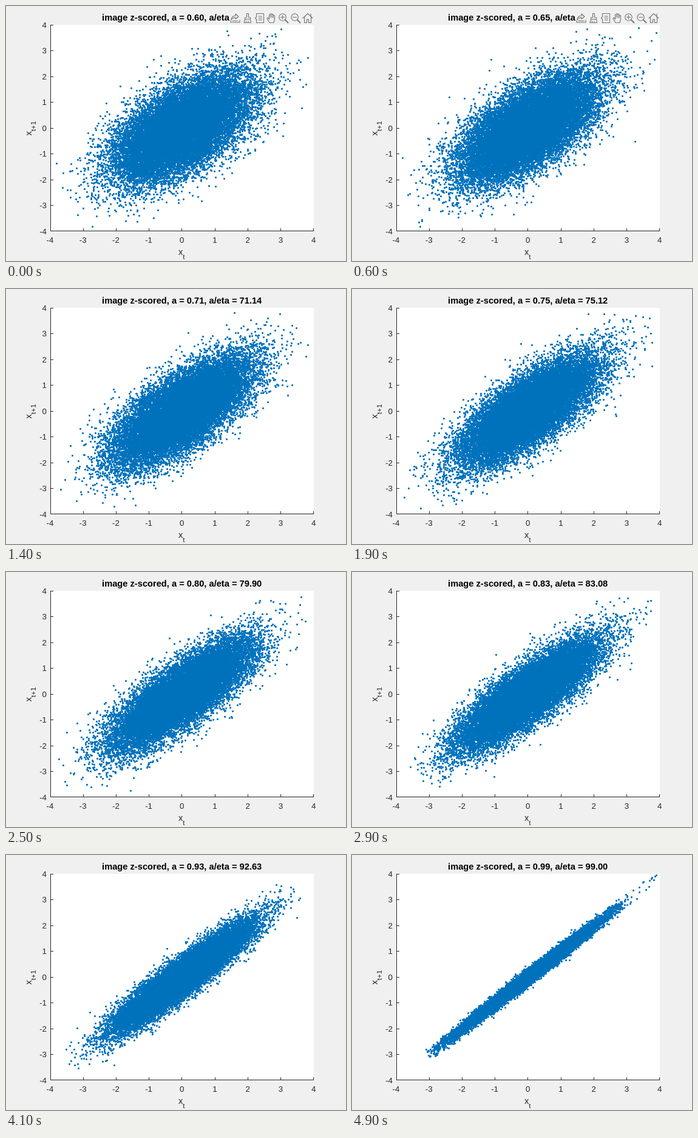
An HTML page with a canvas that plays this animation: 560x420 px, repeating every 5000 ms.

```html
<!DOCTYPE html>
<html lang="en">
<head>
<meta charset="utf-8">
<title>Lag scatter</title>
<style>
  html, body { margin: 0; width: 100%; height: 100%; overflow: hidden; background: #f0f0f0; }
  #stage { position: relative; width: 560px; height: 420px; overflow: hidden; }
  svg, canvas { position: absolute; left: 0; top: 0; display: block; }
  text { font-family: "Liberation Sans", Arial, sans-serif; fill: #262626; }
  #ticks text { font-size: 13.333px; }
  .label { font-size: 14.667px; }
  .sub { font-size: 11.733px; }
  #title { font-size: 14.667px; font-weight: bold; fill: #000; }
  #axes { stroke: #262626; fill: none; }
  #tools { fill: none; stroke: #737373; stroke-width: 1.1; stroke-linejoin: round; stroke-linecap: round; }
</style>
</head>
<body>
<div id="stage">
  <svg width="560" height="420">
    <rect width="560" height="420" fill="#f0f0f0"/>
    <rect x="73" y="31" width="434" height="340" fill="#fff"/>
    <path id="axes"/>
    <g id="ticks"></g>
    <text class="label" x="284" y="410">x<tspan class="sub" dy="7">t</tspan></text>
    <text class="label" transform="translate(42 213.5) rotate(-90)">x<tspan class="sub" dy="7">t+1</tspan></text>
    <text id="title" x="289.7" y="24" text-anchor="middle"></text>
    <g id="tools">
      <rect x="368.5" y="10" width="139" height="20" fill="#f0f0f0" stroke="none"/>
      <g transform="translate(377 20)">
        <path d="M-6 3C-6-1-3-4 1-4V-7L6-2.5 1 1.5V-1C-2-1-4 0-6 3ZM-7 4V7H8V3M-4 4.5H5"/>
      </g>
      <g transform="translate(398 20)">
        <path d="M-1.5-7.5H1.5V-1H4.5V2H-4.5V-1H-1.5ZM-4.5 2L-6 7.5H5.5L4.5 2M-2.5 7.5V5M1 7.5V5"/>
      </g>
      <g transform="translate(417.5 20)">
        <path d="M-5-7.5H7V7.5H-5V2L-7 0-5-2ZM-1.5-3H4M-1.5 0H4M-1.5 3H4"/>
      </g>
      <g transform="translate(437 20)">
        <path d="M-3 7.5L-7 1C-7.5-.5-5.5-1-4.5.5L-3.5 2V-5C-3.5-6.7-1.3-6.7-1.3-5V-1V-6.3C-1.3-8 1-8 1-6.3V-1V-5.5C1-7 3.2-7 3.2-5.5V-.5V-3.5C3.2-5 5.5-5 5.5-3.5V2L4 7.5Z"/>
      </g>
      <g transform="translate(457 20)">
        <circle cx="-1.5" cy="-1.5" r="5.7"/>
        <path d="M-4.5-1.5H1.5M-1.5-4.5V1.5"/><path d="M3 3L7.5 7.5" stroke-width="1.8"/>
      </g>
      <g transform="translate(477 20)">
        <circle cx="-1.5" cy="-1.5" r="5.7"/>
        <path d="M-4.5-1.5H1.5"/><path d="M3 3L7.5 7.5" stroke-width="1.8"/>
      </g>
      <g transform="translate(497 20)">
        <path d="M-8 0L0-7.5 8 0M-5.5-2V7.5H-1.5V2H1.5V7.5H5.5V-2M5-3V-7"/>
      </g>
    </g>
  </svg>
  <canvas id="plot" width="560" height="420"></canvas>
</div>
<script>
const STEPS = 50, STEP_MS = 100, COUNT = 22500, TOOLS_END = 9;
const $ = id => document.getElementById(id);
const ctx = $('plot').getContext('2d');
const px = v => 73 + (v + 4) * 54.2;
const py = v => 371 - (v + 4) * 42.5;

function drawAxes() {
  let d = 'M73.5 31V371M73 370.5H507';
  let labels = '';
  for (let v = -4; v <= 4; v++) {
    const x = Math.min(506, Math.floor(px(v)));
    const y = Math.min(370, Math.floor(py(v)));
    d += `M${x + 0.5} 371V366M73 ${y + 0.5}H78`;
    labels += `<text x="${px(v) - (v < 0 ? 0.5 : 0)}" y="390" text-anchor="middle">${v}</text>`;
    labels += `<text x="67" y="${Math.floor(py(v)) + 5}" text-anchor="end">${v}</text>`;
  }
  $('axes').setAttribute('d', d);
  $('ticks').innerHTML = labels;
}

function makeDot() {
  const dot = document.createElement('canvas');
  dot.width = dot.height = 3;
  const c = dot.getContext('2d');
  c.fillStyle = '#0072bd';
  c.globalAlpha = 0.7;
  c.fillRect(0, 0, 3, 3);
  c.globalAlpha = 1;
  c.fillRect(1, 0, 1, 3);
  c.fillRect(0, 1, 3, 1);
  return dot;
}

function random(seed) {
  return () => {
    seed = (seed + 0x6d2b79f5) | 0;
    let t = Math.imul(seed ^ (seed >>> 15), 1 | seed);
    t = (t + Math.imul(t ^ (t >>> 7), 61 | t)) ^ t;
    return ((t ^ (t >>> 14)) >>> 0) / 4294967296;
  };
}

// z-scored first-order autoregressive series
function series(a, seed) {
  const rnd = random(seed);
  const gauss = () => Math.sqrt(-2 * Math.log(1 - rnd())) * Math.cos(2 * Math.PI * rnd());
  const noise = Math.sqrt(1 - a * a);
  const xs = new Float64Array(COUNT + 1);
  let x = gauss(), sum = 0, squares = 0;
  for (let i = 0; i <= COUNT; i++) {
    xs[i] = x;
    sum += x;
    squares += x * x;
    x = a * x + noise * gauss();
  }
  const mean = sum / xs.length;
  const sd = Math.sqrt(squares / xs.length - mean * mean);
  return xs.map(v => (v - mean) / sd);
}

const dot = makeDot();

function draw(step) {
  const a = 0.6 + 0.39 * step / (STEPS - 1);
  $('title').textContent = `image z-scored, a = ${a.toFixed(2)}, a/eta = ${(a * 100).toFixed(2)}`;
  $('tools').style.display = step < TOOLS_END ? '' : 'none';
  ctx.clearRect(0, 0, 560, 420);
  const xs = series(a, 1009 + step * 7919);
  for (let i = 0; i < COUNT; i++) {
    const x = xs[i], y = xs[i + 1];
    if (Math.abs(x) < 3.95 && Math.abs(y) < 3.95) {
      ctx.drawImage(dot, Math.round(px(x)) - 1, Math.round(py(y)) - 1);
    }
  }
}

drawAxes();
const start = performance.now();
let shown = -1;
function tick() {
  const step = Math.floor((performance.now() - start) / STEP_MS) % STEPS;
  if (step !== shown) draw(shown = step);
  requestAnimationFrame(tick);
}
tick();
</script>
</body>
</html>
```
